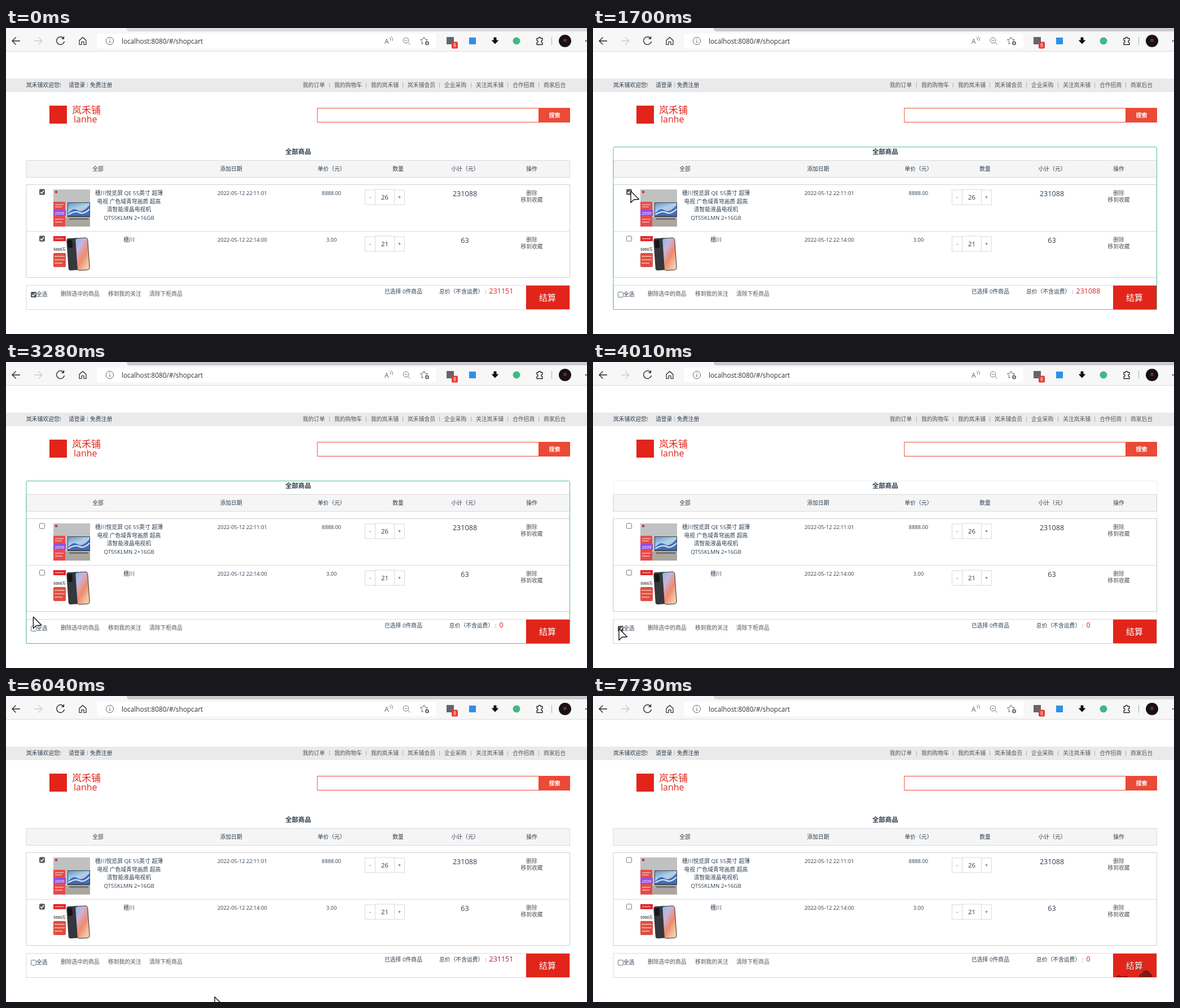
An HTML page for the animation above (7760 ms loop, 1030 by 544 pixels).

```html
<!DOCTYPE html>
<html lang="zh-CN">
<head>
<meta charset="utf-8">
<title>Shop cart</title>
<style>
html, body { margin: 0; width: 100%; height: 100%; overflow: hidden; background: #fff; }
svg { display: block; font-family: "Open Sans", "Noto Sans CJK SC", "Noto Sans CJK", sans-serif; }
</style>
</head>
<body>
<svg id="stage" width="1030" height="544" viewBox="0 0 1030 544"></svg>
<script>
const LOOP = 7760, RED = '#e1251b', LINE = '#d9d9d9', INK = '#2c3e50';

const text = (x, y, s, o = {}) =>
  `<text x="${x}" y="${y}" font-size="${o.size || 9.8}" fill="${o.fill || INK}"
    text-anchor="${o.at || 'start'}" font-weight="${o.weight || 400}">${s}</text>`;
const mid = (x, y, s, o) => text(x, y, s, { ...o, at: 'middle' });
const box = (x, y, w, h, fill, stroke = 'none', r = 0) =>
  `<rect x="${x}" y="${y}" width="${w}" height="${h}" rx="${r}" fill="${fill}" stroke="${stroke}"/>`;
const dot = (x, y, r, fill, stroke = 'none') =>
  `<circle cx="${x}" cy="${y}" r="${r}" fill="${fill}" stroke="${stroke}"/>`;
const line = (d, stroke, w = 1, fill = 'none') =>
  `<path d="${d}" stroke="${stroke}" stroke-width="${w}" fill="${fill}" stroke-linejoin="round"/>`;
const gradient = (id, ...stops) =>
  `<linearGradient id="${id}" x2=".6" y2="1">${stops.map((c, i) =>
    `<stop offset="${i / (stops.length - 1)}" stop-color="${c}"/>`).join('')}</linearGradient>`;
const checkbox = (id, x, y) =>
  box(x + .5, y + .5, 9, 9, '#fff', '#767676', 1.5) +
  `<g id="${id}">${box(x, y, 10, 10, '#5a5a5a', 'none', 2)}
    ${line(`M${x + 2} ${y + 5.2}l2.2 2.2 4-4.8`, '#fff', 1.5)}</g>`;

const toolbar = () =>
  box(0, 0, 1030, 41, '#f7f7f7') + box(0, 41, 1030, 1, '#dcdcdc') +
  '<path id="tabs" d="M214 0H1030V6H219Q214 6 214 0Z"/>' +
  line('M25 23H11.5M17.5 16.5L11 23l6.5 6.5', '#222', 1.3) +
  line('M50 23H63.5M57.5 16.5L64 23l-6.5 6.5', '#ccc', 1.3) +
  line('M102 18A7 7 0 1 0 103.5 24M102.5 15v4h-4', '#222', 1.3) +
  line('M130 22l6-5.5 6 5.5v7.5h-4v-5h-4v5h-4z', '#222', 1.2) +
  box(161, 10, 602, 26, '#fff', 'none', 4) +
  dot(184, 23, 6.6, 'none', '#666') + line('M184 22v4.5M184 19v1.3', '#666', 1.2) +
  text(205, 27.5, 'localhost:8080/#/shopcart', { size: 11.8, fill: '#333' }) +
  text(671, 28, 'A', { size: 12, fill: '#666' }) +
  line('M680 17q2.5 2 1.5 5M682.5 15q4 3 2.5 8', '#777') +
  dot(709, 22, 4.8, 'none', '#777') + line('M706.5 22h5M712.5 25.5l4 4', '#777') +
  line('M741 16l2 4 4.5.6-3.2 3.2M741 16l-2 4-4.5.6 3.3 3.3-.8 4.6 3-1.6', '#666') +
  dot(746.5, 27, 3.6, '#666') + line('M744.5 27h4M746.5 25v4', '#fff') +
  box(781, 16, 13, 13, '#62666c') + box(790, 24.5, 11, 12, '#e53b32', 'none', 2) +
  mid(795.5, 34, '8', { size: 9, fill: '#fff' }) +
  box(821, 17, 12, 12, '#2f8fe8') +
  line('M865 17h4v5h3.5l-5.5 6-5.5-6h3.5z', '#111', 1, '#111') +
  dot(905, 23, 6.5, '#41b883') +
  line('M941 18.5h3a2 2 0 0 1 4 0h3v3.5a2 2 0 0 0 0 4v3.5h-10v-3.5a2 2 0 0 0 0-4z', '#222', 1.3) +
  box(967, 16, 1, 14, '#aaa') + dot(991, 23, 11, '#141216') + dot(991, 22, 3, '#7c2430') +
  dot(1028, 23, 1.2, '#333');

const siteHead = () => {
  const links = { 526: '我的订单', 582: '我的购物车', 647: '我的岚禾铺', 712: '岚禾铺会员',
    777: '企业采购', 833: '关注岚禾铺', 898: '合作招商', 953: '商家后台' };
  return box(0, 90, 1030, 24, '#eaeaea') +
    text(36, 105, '岚禾铺欢迎您!') + text(111, 105, '请登录') + text(149, 105, '免费注册') +
    box(144, 97, 1, 9, '#b3aeae') +
    Object.entries(links).map(([x, s], i) =>
      text(x, 105, s, { fill: '#555' }) + (i ? box(x - 9, 97, 1, 9, '#b3aeae') : '')).join('') +
    box(77, 138, 31, 32, RED) +
    text(117, 152, '岚禾铺', { size: 17, fill: RED, weight: 500 }) +
    text(120, 167.5, 'lanhe', { size: 16, fill: RED }) +
    box(552, 142.5, 393, 25, '#fff', '#ea4a36') + box(944, 142, 56, 26, '#ea4a36') +
    mid(972.5, 158.5, '搜索', { size: 10, fill: '#fff', weight: 700 });
};

const tvPicture = () =>
  box(84, 287, 65, 66, '#bfc2c1') + box(84, 337, 65, 16, '#aaa7a1') +
  box(87, 289.5, 4, 4, '#d8262c') +
  box(109, 310, 40, 26, '#3b4250') + box(110, 311, 38, 23, 'url(#screen)') +
  line('M110 330q9-12 17-6t21-9v19h-38z', 'none', 0, '#3f6fc0') +
  line('M110 332q12-8 20-4t18-6', '#e6eef6', 2) +
  box(112, 338, 34, 3, '#77736d') +
  box(84, 309, 21, 44, '#e64a4e') + box(84, 323, 22, 11, '#9650dd', 'none', 1) +
  mid(95, 331.5, '2699', { size: 7.5, fill: '#fff' }) +
  line('M87 314h15M87 318h12M87 340h15M87 345h13', '#f6b9a8', 1.6);

const phonePicture = () =>
  box(84, 370, 22, 9, '#e2262b') + line('M87 374.5h15', '#f4a6a0', 1.6) +
  mid(95, 396, '5000万', { size: 6.5, fill: '#555', weight: 700 }) +
  box(84, 400, 22, 25, '#dd4e45', 'none', 2) +
  line('M86 406h18M86 412h18M86 418h14', '#f6c4a0', 1.6) +
  `<g transform="rotate(-4 128 402)">${box(109, 373, 22, 57, '#34373c', 'none', 4)}
    ${box(111, 376, 8, 14, '#15171a', 'none', 2)}
    ${box(124.5, 374, 22, 57, 'url(#phone)', '#333', 4)}</g>`;

const row = (id, y, name, date, price, count, sum) =>
  checkbox(id, 59, y + 8) +
  name.map((s, i) => mid(218, y + 18.8 + i * 14.5, s)).join('') +
  text(375, y + 18, date, { size: 9.3 }) + mid(577, y + 18, price, { size: 9.3 }) +
  box(636.5, y + 9.5, 18, 26, '#fff', LINE) + box(688.5, y + 9.5, 18, 26, '#fff', LINE) +
  box(654.5, y + 8.5, 34, 27, '#fff', LINE) +
  mid(645.5, y + 25, '-') + mid(697.5, y + 25, '+') +
  mid(671.5, y + 26.3, count, { size: 11.5 }) + mid(813.5, y + 20.5, sum, { size: 12.6 }) +
  mid(932, y + 18.5, '删除', { fill: '#555' }) + mid(932, y + 30.8, '移到收藏', { fill: '#555' });

const cart = () => {
  const heads = { 163: '全部', 399: '添加日期', 577: '单价（元）', 695: '数量', 814: '小计（元）', 932: '操作' };
  const actions = { 97: '删除选中的商品', 181: '移到我的关注', 254: '清除下柜商品' };
  return mid(518, 223.5, '全部商品', { size: 11.4, weight: 700 }) +
    box(36, 235.5, 963.5, 30, '#f5f5f5', LINE) +
    Object.entries(heads).map(([x, s]) => mid(x, 254, s)).join('') +
    box(36, 278.5, 963.5, 165, '#fff', '#d0d0d0') + box(36, 361, 964, 1, LINE) +
    tvPicture() + phonePicture() +
    row('first', 278.5, ['穗川悦览屏 QE 55英寸 超薄', '电视 广色域青穹画质 超高', '清智能液晶电视机', 'QT55KLMN 2+16GB'],
      '2022-05-12 22:11:01', '8888.00', 26, 231088) +
    row('second', 361.5, ['穗川'], '2022-05-12 22:14:00', '3.00', 21, 63) +
    box(36, 457.5, 963.5, 43, '#fff', LINE) + checkbox('all', 44, 469) + text(54, 477, '全选') +
    Object.entries(actions).map(([x, s]) => text(x, 476, s, { fill: '#555' })).join('') +
    text(671, 471.5, '已选择 0件商品') +
    mid(833.7, 471.5, '总价（不含运费） :<tspan id="total" font-size="12.5" dx="5"></tspan>') +
    box(922, 458, 77, 42, RED) +
    `<g id="smudge" fill="#7c1913"><path d="M968 500q0-7 6-7 1-6 7-5 6 0 6 5 5 0 4 7z"/>
      <path d="M927 500l5-4 6 3 5-2 8 3z"/>${mid(961, 486, '结算', { size: 15, fill: '#7c1913' })}</g>` +
    mid(960, 485, '结算', { size: 15, fill: '#fff' });
};

document.getElementById('stage').innerHTML =
  `<defs>${gradient('screen', '#6f8fc8', '#a9d3ea', '#e8a6b4')}
    ${gradient('phone', '#7fc0ea', '#c9b4dc', '#f08a6c', '#f3c9a8')}</defs>` +
  toolbar() + siteHead() + cart() +
  '<rect id="flash" x="36" y="211.5" width="963.5" height="289" rx="2" fill="none" stroke="#41b883"/>' +
  `<g id="cursor">${line('M0 0V20.5L5.3 15.3L14.5 14.5Z', '#111', 1.4, '#fff')}</g>`;

const el = Object.fromEntries(['tabs', 'first', 'second', 'all', 'total', 'smudge', 'flash', 'cursor']
  .map(id => [id, document.getElementById(id)]));

// Each server reply updates the total and flashes the cart outline.
const REPLIES = [1600, 3200, 4790, 6390], FADE = 950;
const TOTALS = [231151, 231088, 0, 231151, 0];

// Cursor stops: time, x, y
const PATH = [
  [0, 900, 547], [100, 898, 542], [560, 61, 371], [780, 61, 371], [980, 91, 356], [1500, 67, 290],
  [2640, 67, 290], [3450, 46, 474], [4030, 46, 474], [4400, 66, 518], [4800, 66, 518],
  [5150, 62, 486], [5400, 46, 474], [5620, 46, 474], [6040, 370, 535], [6120, 410, 547],
  [7180, 990, 547], [7360, 946, 478], [7580, 985, 547], [LOOP, 900, 547]
];

function cursorAt(t) {
  const i = PATH.findIndex(p => p[0] > t);
  const [t0, x0, y0] = PATH[i - 1], [t1, x1, y1] = PATH[i];
  const u = (t - t0) / (t1 - t0), e = u * u * (3 - 2 * u);
  return [x0 + (x1 - x0) * e, y0 + (y1 - y0) * e];
}

const show = (node, on) => node.setAttribute('visibility', on ? 'visible' : 'hidden');
const within = (t, a, b) => t >= a && t < b;

function draw(now) {
  const t = now % LOOP;
  const replies = REPLIES.filter(r => r <= t);
  const bothChecked = within(t, REPLIES[2], REPLIES[3]);
  show(el.first, t < 2320 || bothChecked);
  show(el.second, t < 600 || bothChecked);
  show(el.all, t < REPLIES[0] || within(t, 3950, 5600));
  show(el.smudge, t >= 7400);
  el.total.textContent = TOTALS[replies.length];
  el.total.setAttribute('fill', bothChecked ? '#a8182a' : '#d8221f');
  el.tabs.setAttribute('fill', within(t, 780, 7730) ? '#cbcbcb' : '#dadada');
  const age = replies.length ? t - replies.at(-1) : FADE;
  el.flash.setAttribute('opacity', Math.max(0, 1 - age / FADE));
  el.cursor.setAttribute('transform', `translate(${cursorAt(t)})`);
  requestAnimationFrame(draw);
}
requestAnimationFrame(draw);
</script>
</body>
</html>
```
